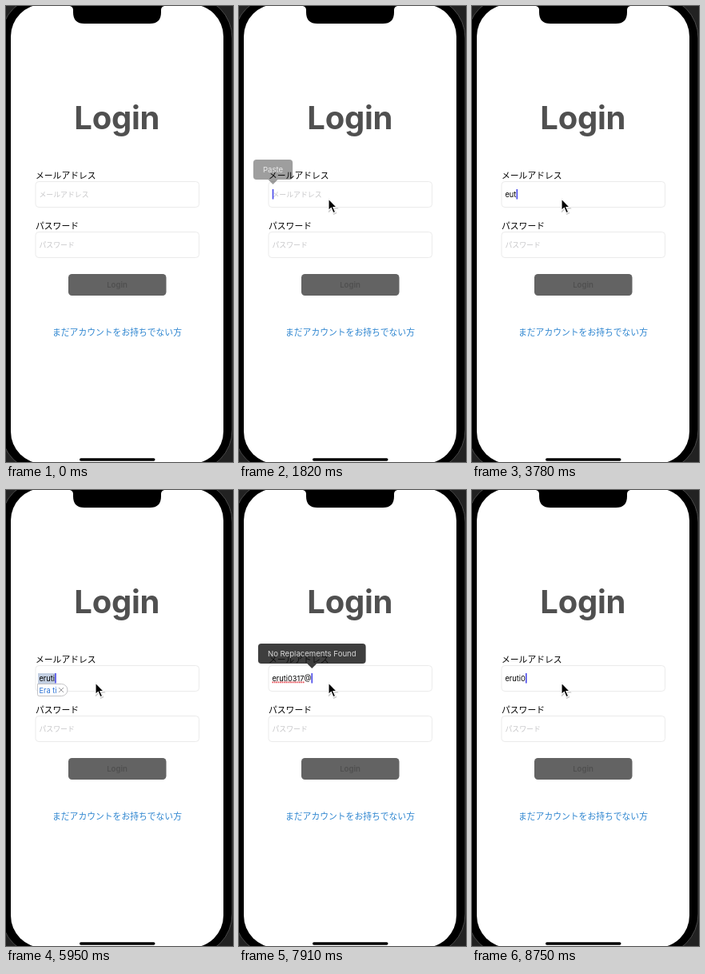
An HTML page for the animation above (9030 ms loop, 284x570 px).

```html
<!DOCTYPE html>
<html lang="ja">
<head>
<meta charset="utf-8">
<title>Login</title>
<style>
  html, body { margin: 0; width: 100%; height: 100%; overflow: hidden; background: #222; }
  svg { display: block; width: 284px; height: 570px; }
  text { font-family: Inter, "Noto Sans CJK JP", "Noto Sans CJK", sans-serif; white-space: pre; }
  .mid { text-anchor: middle; }
  .label { font-size: 10.8px; }
  .hint { font-size: 8.9px; fill: #c6c6c8; }
  .typed { font-size: 9.2px; }
  .field { fill: #fff; stroke: #e6e6e6; stroke-width: .8; }
</style>
</head>
<body>
<svg viewBox="0 0 284 570">
  <rect x="-6" y="-12" width="289" height="594" rx="52" stroke="#4a4a4a"/>
  <rect x="6" y="-2" width="266" height="574" rx="40" fill="#fff"/>
  <path d="M80 0Q84 1 84 5V8Q84 22 98 22H180Q194 22 194 8V5Q194 1 198 0Z"/>
  <rect x="92" y="565.3" width="94.500" height="3.400" rx="1.700"/>

  <text class="mid" x="138.700" y="154" font-size="40" font-weight="700" letter-spacing="-.3" fill="#505050">Login</text>
  <text class="label" x="37" y="216">メールアドレス</text>
  <rect class="field" x="37" y="219.500" width="204.500" height="32" rx="4"/>
  <text class="label" x="37" y="279">パスワード</text>
  <rect class="field" x="37" y="282.500" width="204.500" height="32" rx="4"/>
  <text class="hint" x="41.500" y="301.500">パスワード</text>
  <rect x="78" y="335" width="122.500" height="27" rx="4.500" fill="#636363"/>
  <text class="mid" x="139" y="352" font-size="9.600" font-weight="600" fill="#505050">Login</text>
  <text class="label mid" x="139" y="411.700" fill="#2f86d0">まだアカウントをお持ちでない方</text>

  <rect id="mark" x="40" y="229" height="13" fill="#c3cfe2"/>
  <text id="hint" class="hint" x="41.500" y="239">メールアドレス</text>
  <text id="typed" class="typed" x="41.500" y="239"></text>
  <path id="wavy" stroke="#e2434c" stroke-width="1.700" stroke-dasharray="1.600 .8"/>
  <rect id="caret" y="229" width="1.600" height="12.500" fill="#4848ea"/>

  <g id="bubble">
    <path id="bubbleBox" fill="#fff" stroke="#b4b4b8" stroke-width=".8"/>
    <text id="guess" class="typed" x="41.500" y="253.500" fill="#2b72d4"></text>
    <path id="cross" d="M-3 247l6 6m0-6l-6 6" stroke="#8c8c90" stroke-width=".9"/>
  </g>

  <g id="menu">
    <path id="menuBox" fill="#141414" fill-opacity=".82"/>
    <text id="menuText" class="mid" y="208" font-size="9.600" fill="#d6d6d6"></text>
  </g>

  <g id="pointer">
    <path d="M0 0V14.500L3.300 11.500L6 17.700L8.600 16.600L5.900 10.500H10.300Z" transform="translate(.7 1.200)" fill="#000" opacity=".2" stroke="#000" stroke-width="1.500"/>
    <path d="M0 0V14.500L3.300 11.500L6 17.700L8.600 16.600L5.900 10.500H10.300Z" stroke="#fff" stroke-width="1.100"/>
  </g>
</svg>
<script>
const LOOP = 9030, STEP = 70;
const $ = id => document.getElementById(id);
const set = (id, attrs) => { for (const k in attrs) $(id).setAttribute(k, attrs[k]); };
const ramp = (t, from, to) => Math.min(1, Math.max(0, (t - from) / (to - from)));
const within = (t, from, to) => t >= from && t < to;
const width = id => $(id).getComputedTextLength();

// [start, text in the mail field]
const typing = [
  [0, ""], [1960, "e"], [3080, "eu"], [3150, "eut"], [3290, "euti"],
  [3780, "eut"], [3920, "eu"], [4130, "e"],
  [4410, "er"], [4620, "eru"], [4830, "erut"], [5040, "eruti"],
  [6020, "eruti0"], [6160, "eruti03"], [6300, "eruti031"], [6370, "eruti0317"],
  [6860, "eruti0317@"], [8470, "eruti031"], [8680, "eruti03"], [8750, "eruti0"]
];
// [fade out start, end, fade in start, end]
const blinks = [[2310, 2590, 2730, 3010], [5320, 5460, 5670, 5950], [7350, 7560, 7630, 7840]];
// [start, end, suggestion]
const guesses = [[3570, 3780, "Duty"], [5250, 6020, "Era ti"]];
// [start, shown, leaving, end, text]
const menus = [
  [1750, 1890, 1890, 2030, "Paste"],
  [7350, 7630, 8540, 8680, "No Replacements Found"]
];

function drawMenu(t, x) {
  const m = menus.find(m => within(t, m[0], m[3]));
  set("menu", { opacity: m ? ramp(t, m[0], m[1]) * (1 - ramp(t, m[2], m[3])) : 0 });
  if (!m) return;
  $("menuText").textContent = m[4];
  const w = width("menuText") + 24, left = x - w / 2;
  set("menuText", { x });
  set("menuBox", {
    d: `M${left + 4} 192h${w - 8}q4 0 4 4v17q0 4-4 4H${x + 6}l-6 6l-6-6H${left + 4}q-4 0-4-4v-17q0-4 4-4Z`
  });
}

function drawBubble(t, end) {
  const g = guesses.find(g => within(t, g[0], g[1]));
  set("bubble", { opacity: g ? 1 : 0 });
  set("mark", { width: g ? end - 40 : 0 });
  if (!g) return;
  $("guess").textContent = g[2];
  const x = 41.5 + width("guess");
  set("cross", { transform: `translate(${x + 5.5} 0)` });
  set("bubbleBox", { d: `M39.500 242.500H${x + 6}a7.500 7.500 0 0 1 0 15H41.500q-2 0-2-2Z` });
}

function draw(t) {
  const text = typing.findLast(e => t >= e[0])[1];
  $("typed").textContent = text;
  const end = 42 + (text ? width("typed") : 0);
  set("hint", { opacity: text ? 0 : 1 });

  let caret = t >= 1120 ? 1 : 0;
  for (const [a, b, c, d] of blinks)
    if (within(t, a, d)) caret = Math.max(1 - ramp(t, a, b), ramp(t, c, d));
  set("caret", { x: end - .3, opacity: caret });

  const bad = within(t, 6930, 8680);
  const wordEnd = text.endsWith("@") ? end - 9 : end - 1;
  set("wavy", { d: `M41.500 240.300H${wordEnd}`, opacity: bad ? 1 : 0 });

  drawBubble(t, end);
  drawMenu(t, end + .5);

  // the pointer glides in, then nudges up to click
  const far = (1 - ramp(t, 70, 980)) ** 3, nudge = ramp(t, 1050, 1330);
  set("pointer", {
    transform: `translate(${113 + 29 * far - nudge} ${245.5 + 179 * far - 4.5 * nudge})`,
    opacity: t >= 70 ? 1 : 0
  });
}

const start = performance.now();
function tick() {
  const t = (performance.now() - start) % LOOP;
  draw(Math.floor(t / STEP) * STEP);
  requestAnimationFrame(tick);
}
tick();
</script>
</body>
</html>
```
